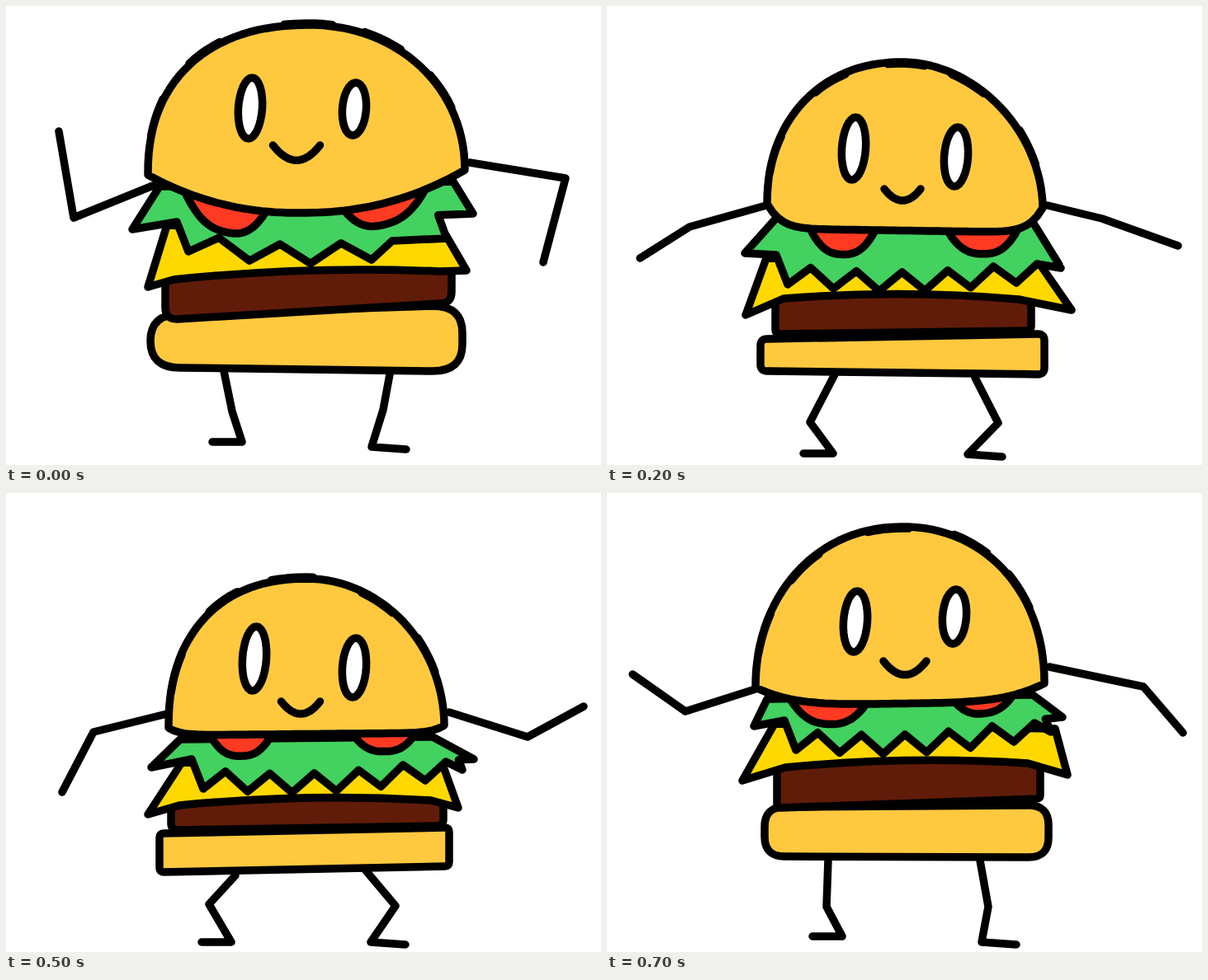
Write an HTML page that moves like this. It is 721x557 px and loops after 0.8 s.

```html
<!DOCTYPE html>
<html lang="en">
<head>
<meta charset="utf-8">
<title>Dancing burger</title>
<style>
html, body { margin: 0; width: 100%; height: 100%; overflow: hidden; background: #fff; }
svg { display: block; width: 721px; height: 557px; }
path { stroke: #000; stroke-width: 9.5; stroke-linecap: round; stroke-linejoin: round; }
</style>
</head>
<body>
<svg id="stage" viewBox="0 0 721 557"></svg>
<script>
const NS = 'http://www.w3.org/2000/svg';
const BUN = '#ffc93f', GREEN = '#43d160', RED = '#ff3a22', YELLOW = '#ffd800', BROWN = '#601c08';

/* crown: left and right corner, top, sag, then left, right and base roundness
   eyes: x, y, half height     smile: x, y, width     tomatoes: left, right, drop
   teeth: first and last tip, spans     ears: left tip, right frill, right tip
   cheese: left tip, right tip, right shoulder x
   patty, heel: left, right, top left, top right, bottom left, bottom right, radius
   arms: shoulder y, elbow, hand     legs: hip x, knee, ankle */
const high = {
  crown: [172, 205, 556, 199, 23, 49, 2.3, 2.05, 2.2],
  eyes: [[296, 124, 37], [422, 125, 32]], smile: [352, 169, 57],
  tomatoes: [[217, 315, 33], [410, 508, 26]],
  teeth: [221, 298, 443, 308, 3], ears: [[153, 271], [534, 282], [566, 252]],
  cheese: [172, 341, 558, 321, 533],
  patty: [193, 540, 332, 322, 380, 361, 14], heel: [175, 553, 374, 364, 439, 443, 36],
  arms: [[218, 82, 257, 64, 152], [190, 678, 209, 651, 311]],
  legs: [[264, 274, 492, 286, 529], [465, 457, 490, 443, 535]]
};
const mid = {
  crown: [180, 236, 530, 231, 41, 22, 2.1, 2.1, 4],
  eyes: [[301, 156, 37], [421, 150, 33]], smile: [361, 204, 52],
  tomatoes: [[222, 314, 25], [422, 492, 16]],
  teeth: [229, 312, 493, 302, 5], ears: [[178, 283], [538, 290], [552, 272]],
  cheese: [164, 349, 558, 342, 543],
  patty: [206, 525, 333, 328, 382, 371, 4], heel: [191, 535, 381, 379, 441, 442, 24],
  arms: [[236, 95, 265, 31, 220], [211, 650, 235, 698, 291]],
  legs: [[268, 266, 502, 285, 538], [452, 462, 502, 454, 545]]
};
const low = {
  crown: [194, 240, 528, 245, 68, 30, 2.15, 1.9, 10],
  eyes: [[299, 173, 38], [423, 183, 36]], smile: [358, 222, 44],
  tomatoes: [[246, 325, 30], [413, 498, 27]],
  teeth: [219, 338, 496, 336, 5], ears: [[167, 300], [550, 318], [548, 314]],
  cheese: [168, 375, 563, 369, 525],
  patty: [204, 514, 355, 356, 398, 394, 5], heel: [186, 530, 404, 398, 443, 447, 8],
  arms: [[240, 100, 268, 40, 306], [242, 600, 258, 692, 291]],
  legs: [[276, 246, 505, 274, 543], [446, 474, 506, 437, 544]]
};
const squat = {
  crown: [197, 285, 531, 282, 104, 9, 2.3, 1.97, 12],
  eyes: [[301, 201, 39], [422, 212, 36]], smile: [357, 253, 47],
  tomatoes: [[247, 322, 26], [420, 497, 22]],
  teeth: [239, 359, 508, 349, 5], ears: [[176, 333], [553, 336], [567, 323]],
  cheese: [172, 390, 548, 382, 530],
  patty: [200, 530, 379, 373, 409, 404, 8], heel: [186, 537, 413, 406, 460, 453, 5],
  arms: [[266, 106, 290, 68, 363], [266, 632, 296, 700, 259]],
  legs: [[278, 246, 499, 273, 545], [435, 472, 501, 442, 545]]
};
const deep = {
  ...squat,
  press: 'translate(0 20.3) scale(1 .977)',
  arms: [[280, 112, 298, 101, 383], [281, 636, 299, 662, 222]],
  legs: [[278, 243, 506, 271, 547], [437, 476, 507, 443, 547]]
};

const mix = (a, b, t) => a + (b - a) * t;
const range = (n, f) => Array.from({ length: n + 1 }, (_, i) => f(i / n));
const path = pts => 'M' + pts.map(p => p.map(v => v.toFixed(1))).join('L');

function random(seed) {
  return () => (seed = seed * 16807 % 2147483647) / 2147483647;
}

// Upper half of an ellipse whose two sides may be squarer than round.
function dome([x0, y0, x1, y1, top, , left, right]) {
  const rx = (x1 - x0) / 2, h = (y0 + y1) / 2 - top;
  return range(60, t => {
    const c = -Math.cos(Math.PI * t), power = 2 / (c < 0 ? left : right);
    const u = Math.sign(c) * Math.abs(c) ** power;
    return [x0 + rx * (1 + u), mix(y0, y1, (1 + u) / 2) - h * Math.sin(Math.PI * t) ** power];
  });
}

function baseY([x0, y0, x1, y1, , sag, , , round], x) {
  const t = (x - x0) / (x1 - x0);
  return mix(y0, y1, t) + sag * (1 - Math.abs(2 * t - 1) ** round);
}

const crown = c => path([...dome(c), ...range(50, t => {
  const x = mix(c[2], c[0], t);
  return [x, baseY(c, x)];
})]) + 'Z';

// Brush strokes that overlap the dome a little off its line.
function overlaps(c, seed) {
  const rnd = random(seed), pts = dome(c);
  return range(4, t => {
    const from = Math.floor(4 + t * 42 + rnd() * 4), off = rnd() < 0.5 ? -2 : 2;
    return path(pts.slice(from, from + 6).map(([x, y]) => [x, y + off]));
  }).join('');
}

const eye = ([x, y, ry]) => path(range(32, t => {
  const a = t * 2 * Math.PI, dy = -ry * Math.cos(a);
  return [x + 14.5 * Math.sin(a) - dy * 0.06, y + dy];
})) + 'Z';

const smile = ([x, y, w]) => path(range(16, t =>
  [x + w * (t - 0.5), y + w * 0.32 * (1 - (2 * t - 1) ** 2)]));

const tomato = ([x0, x1, drop], c) => path([
  [x0, baseY(c, x0) - 8],
  ...range(24, t => {
    const x = mix(x0, x1, t);
    return [x, baseY(c, x) + drop * (1 - Math.abs(2 * t - 1) ** 2.6)];
  }),
  [x1, baseY(c, x1) - 8]
]);

const fold = ([x, y]) => [x - 14, y - 36];

function lettuce({ crown: [x0, y0, x1, y1], teeth, ears: [tipL, frill, tipR] }) {
  const [ax, ay, bx, by, spans] = teeth;
  const zigzag = range(2 * spans, t => [
    mix(ax, bx, t),
    mix(ay, by, t) + 9 * Math.sin(Math.PI * t) - (Math.round(t * 2 * spans) % 2) * 23
  ]);
  const gap = Math.hypot(tipR[0] - frill[0], tipR[1] - frill[1]);
  const notch = [(frill[0] + tipR[0]) / 2 - gap * 0.6, (frill[1] + tipR[1]) / 2 - gap * 0.3];
  return path([[x0 + 14, y0 + 14], tipL, fold(teeth), ...zigzag,
    [bx + 25, by - 23], frill, notch, tipR, [x1 - 14, y1 + 14]]) + 'Z';
}

function cheese({ teeth, ears, cheese: [lx, ly, rx, ry, shoulder], patty: [x0, x1, t0, t1] }) {
  const [fx, fy] = fold(teeth);
  return `M${fx - 12},${fy + 4}L${lx},${ly}L${x0 + 10},${t0}` +
    `Q${(x0 + x1) / 2},${(t0 + t1) / 2 - 12} ${x1 - 15},${t1}L${rx},${ry}L${shoulder},${ears[1][1] - 4}Z`;
}

function slab([x0, x1, t0, t1, b0, b1, r], lift = 0) {
  const ry = Math.min(r, (b0 - t0) / 2);
  t0 -= lift;
  t1 -= lift;
  return `M${x0 + r},${t0}Q${x0},${t0} ${x0},${t0 + ry}L${x0},${b0 - ry}Q${x0},${b0} ${x0 + r},${b0}` +
    `L${x1 - r},${b1}Q${x1},${b1} ${x1},${b1 - ry}L${x1},${t1 + ry}Q${x1},${t1} ${x1 - r},${t1}Z`;
}

function limbs({ crown: c, heel, arms, legs }) {
  return [0, 1].map(side => {
    const [sy, ex, ey, hx, hy] = arms[side];
    const [hip, kx, ky, ax, ay] = legs[side];
    const toe = side ? [ax + 42, ay + 3] : [ax - 36, ay];
    return path([[c[2 * side] + 6, sy], [ex, ey], [hx, hy]]) +
      path([[hip, heel[4 + side] + 4], [kx, ky], [ax, ay], toe]);
  }).join('');
}

function add(parent, tag, attrs) {
  const el = document.createElementNS(NS, tag);
  for (const k in attrs) el.setAttribute(k, attrs[k]);
  return parent.appendChild(el);
}

function build(pose, i) {
  const root = add(document.getElementById('stage'), 'g', { display: 'none' });
  add(root, 'path', { d: limbs(pose), fill: 'none' });
  const body = add(root, 'g', { transform: pose.press || 'scale(1)' });
  const paint = (d, fill = 'none') => add(body, 'path', { d, fill });
  paint(slab(pose.heel), BUN);
  paint(slab(pose.patty, 12), BROWN);
  paint(cheese(pose), YELLOW);
  paint(lettuce(pose), GREEN);
  pose.tomatoes.forEach(t => paint(tomato(t, pose.crown), RED));
  paint(crown(pose.crown), BUN);
  paint(overlaps(pose.crown, 11 + i));
  pose.eyes.forEach(e => paint(eye(e), '#fff'));
  paint(smile(pose.smile));
  return root;
}

const views = [high, mid, low, squat, deep].map(build);
const LAST = views.length - 1, STEP = 100;
const start = performance.now();
let shown = -1;

// The poses run down and back up again.
function draw(now) {
  const beat = Math.floor(Math.max(0, now - start) / STEP) % (2 * LAST);
  const next = LAST - Math.abs(LAST - beat);
  if (next !== shown) {
    views.forEach((v, i) => v.setAttribute('display', i === next ? 'inline' : 'none'));
    shown = next;
  }
  requestAnimationFrame(draw);
}
draw(start);
</script>
</body>
</html>
```
